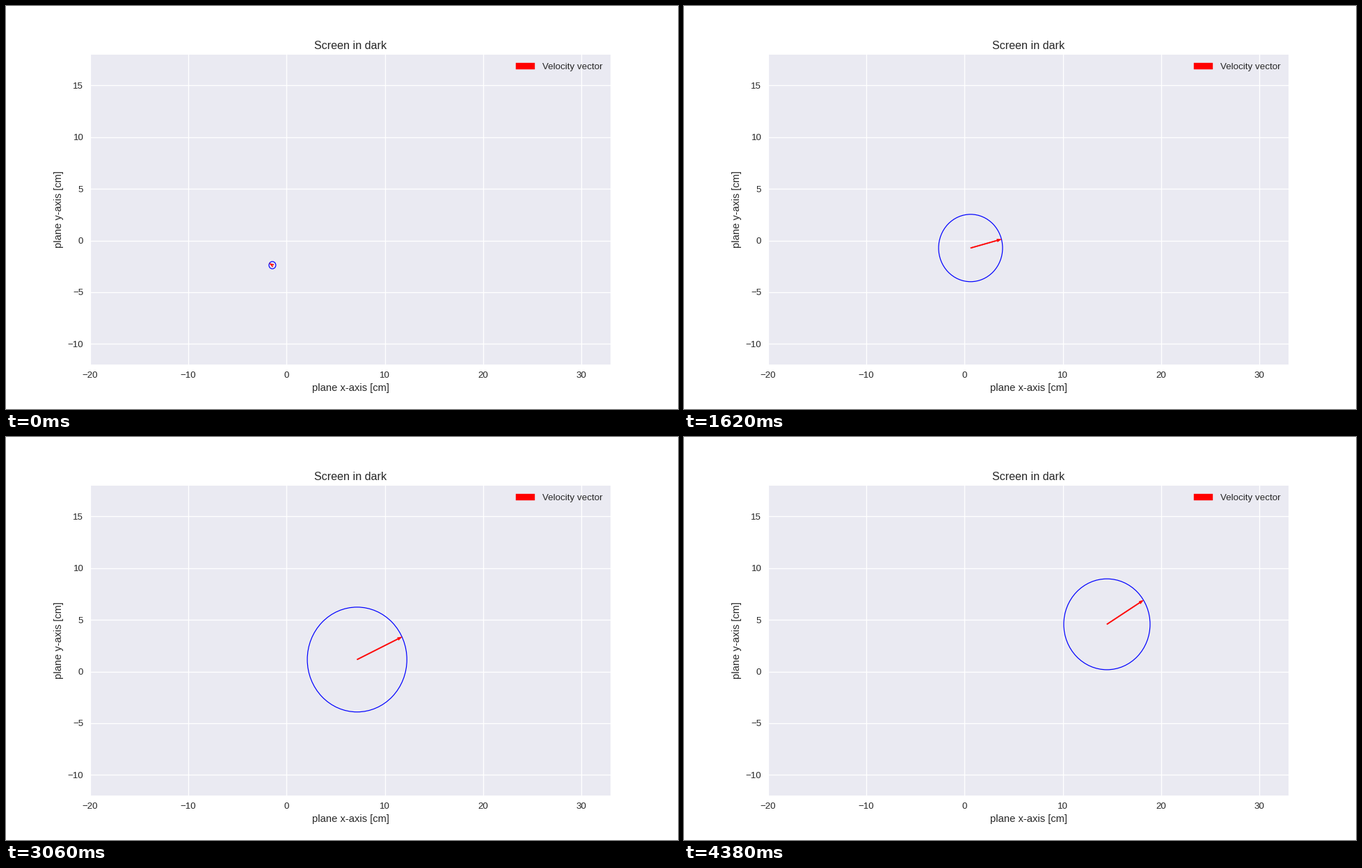
A matplotlib script that plays this animation: 966x580 px, repeating every 6.16 s.

```python
import numpy as np
import matplotlib.pyplot as plt
from matplotlib.animation import FuncAnimation

TICK_MS = 20
STEP_MS = 60
LOOP_MS = 6160
LAST_STEP = 73

plt.rcParams.update({
    "font.family": "Liberation Sans",
    "text.color": "0.15",
    "axes.facecolor": "#EAEAF2",
    "axes.labelcolor": "0.15",
    "axes.labelsize": 11,
    "axes.titlesize": 12,
    "axes.linewidth": 0,
    "axes.grid": True,
    "axes.axisbelow": True,
    "grid.color": "white",
    "grid.linewidth": 1,
    "legend.frameon": False,
    "legend.fontsize": 10,
    "patch.linewidth": 0.3,
    "toolbar": "None",
})
for axis in ("xtick", "ytick"):
    plt.rcParams.update({
        f"{axis}.color": "0.15",
        f"{axis}.labelsize": 10,
        f"{axis}.major.size": 0,
        f"{axis}.major.pad": 7,
    })

# Key points of the path, in cm
STEPS = np.array([0, 11, 19, 34, 43, 51, 59, 66, 73])
PATH = np.array([(-1.44, -2.38), (-1.65, -2.02), (-1.01, -1.44),
                 (2.37, -0.23), (4.48, -0.10), (7.18, 1.16),
                 (10.65, 2.91), (12.26, 3.53), (14.49, 4.57)])
SLOPES = np.gradient(PATH, STEPS, axis=0)


def bump(t, center, height, width):
    return height * np.exp(-0.5 * ((t - center) / width) ** 2)


def position(t):
    """Cubic Hermite curve through the path's key points."""
    i = min(np.searchsorted(STEPS, t, "right"), len(STEPS) - 1) - 1
    span = STEPS[i + 1] - STEPS[i]
    u = (t - STEPS[i]) / span
    ease = u * u * (3 - 2 * u)
    return (PATH[i] + (PATH[i + 1] - PATH[i]) * ease
            + span * u * (1 - u) * (SLOPES[i] * (1 - u) - SLOPES[i + 1] * u))


def speed(t):
    """A slow rise with four surges on top."""
    return (2.2 - 1.85 * np.exp(-t / 20)
            + bump(t, 28.5, 1.7, 3.3) + bump(t, 46, 1.75, 5)
            + bump(t, 53.6, 3.1, 2.7) + bump(t, 71.5, 2.5, 3.2))


def heading(t):
    """Turns from up-left to right, then dips twice towards the horizontal."""
    return np.radians(23.7 + 0.12 * t + bump(t, 0, 126, 7.8)
                      - bump(t, 34, 24, 6) - bump(t, 59.5, 16, 5))


fig, ax = plt.subplots(figsize=(10, 6.00415), dpi=96.6, facecolor="white")
ax.set(xlim=(-20, 33), ylim=(-12, 18),
       xticks=range(-20, 31, 10), yticks=range(-10, 16, 5),
       title="Screen in dark",
       xlabel="plane x-axis [cm]", ylabel="plane y-axis [cm]")

circle = ax.add_patch(plt.Circle((0, 0), 1, fill=False, edgecolor="blue", linewidth=0.9))
arrow = ax.arrow(0, 0, 1, 1, width=0.1, length_includes_head=True,
                 color="red", label="Velocity vector")
ax.legend(handles=[arrow], loc="upper right")


def update(frame):
    step = min(frame * TICK_MS // STEP_MS, LAST_STEP)
    x, y = position(step)
    radius, angle = speed(step), heading(step)
    circle.set_center((x, y))
    circle.set_radius(radius)
    arrow.set_data(x=x, y=y, dx=radius * np.cos(angle), dy=radius * np.sin(angle))
    return circle, arrow


anim = FuncAnimation(fig, update, frames=LOOP_MS // TICK_MS, interval=TICK_MS,
                     repeat=True, repeat_delay=0, blit=False)
plt.show()
```
